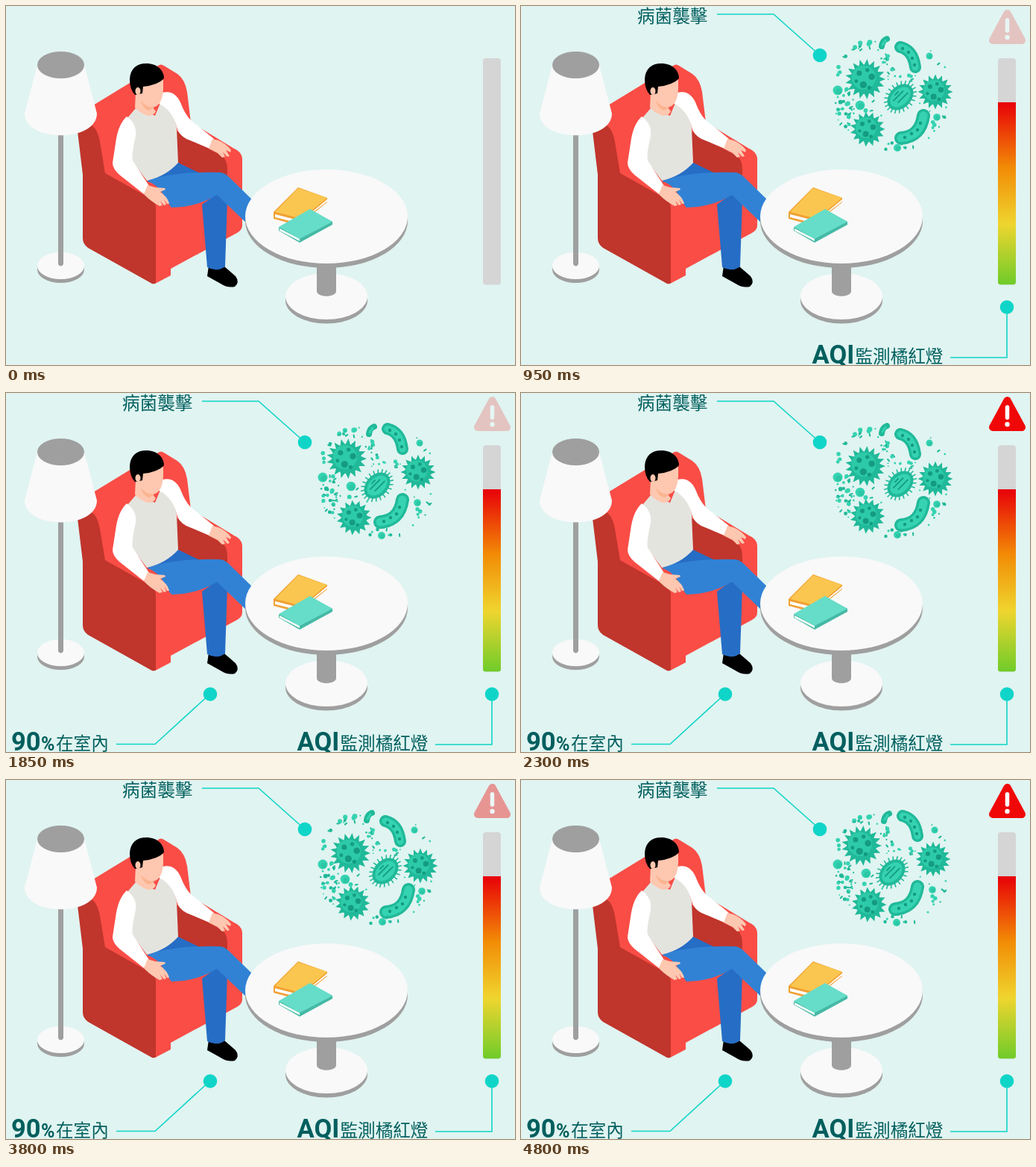
An HTML page for the animation above (5.1 s loop, 683 by 481 pixels).

```html
<!DOCTYPE html>
<html lang="zh-Hant">
<head>
<meta charset="utf-8">
<title>室內空氣</title>
<style>
  html, body { margin: 0; width: 100%; height: 100%; overflow: hidden; background: #e0f4f1; }
  svg { display: block; width: 100vw; height: 100vh; }
  text { font: 500 23.6px "Noto Sans CJK TC", "Noto Sans CJK", sans-serif; fill: #005f5e; }
  .latin { font: 700 34.5px Roboto, sans-serif; }
  .percent { font: 700 25px Roboto, sans-serif; }
  .label path { fill: none; stroke: #0fd5c8; stroke-width: 1.6; }
  .label circle { fill: #0fd5c8; }
  .white { fill: #f9f9f9; } .grey { fill: #9f9f9f; }
  .red { fill: #f94d46; } .maroon { fill: #c0352c; }
  .skin { fill: #fdc7b0; } .blue { fill: #3182d5; } .navy { fill: #266dc5; }
</style>
</head>
<body>
<svg viewBox="0 0 683 481">
  <defs>
    <linearGradient id="scale" gradientUnits="userSpaceOnUse" x1="0" y1="129" x2="0" y2="373">
      <stop offset="0" stop-color="#e80008"/>
      <stop offset=".36" stop-color="#f28c06"/>
      <stop offset=".67" stop-color="#efd52f"/>
      <stop offset="1" stop-color="#70cc2a"/>
    </linearGradient>
    <clipPath id="level"><rect id="levelRect" x="640" width="24"/></clipPath>
  </defs>

  <g id="chair">
    <path class="red" d="M98 168L117 133L204 80Q208 77 212 80L230 91Q240 98 243 115L248 156L306 191Q316 195 317 204V294Q317 300 310 304L221 352V361L200 372L110 250Z"/>
    <path class="maroon" d="M226 166L290 201Q297 206 297 220V240H226Z"/>
    <path class="maroon" d="M96 168L110 158Q122 160 126 182L133 224L194 258Q201 262 201 270V371Q199 373 196 372L110 324Q103 319 103 311V226Z"/>
  </g>

  <g id="lamp">
    <rect class="grey" x="70" y="160" width="7" height="189"/>
    <ellipse class="grey" cx="73.500" cy="353" rx="31.500" ry="18"/>
    <ellipse class="white" cx="73.500" cy="348" rx="31.500" ry="18"/>
    <path class="grey" d="M70 160H77V346Q73.500 351 70 346Z"/>
    <path class="white" d="M42 79L25 144C25 183 122 183 122 144L105 79Z"/>
    <ellipse class="grey" cx="73.500" cy="79" rx="31.500" ry="18"/>
  </g>

  <g id="man">
    <path d="M272 348Q283 357 293 349L308 362Q314 370 307 376Q297 378 288 372L270 362Z"/>
    <path class="navy" d="M263 266L285 250L297 260L294 349Q283 357 270 350ZM229 209L262 225L190 236Z"/>
    <path class="blue" d="M189 234Q230 221 288 223Q294 224 299 229L335 264L326 294L283 253Q255 270 222 270L213 258Q208 242 189 234Z"/>
    <path fill="#e4e4df" d="M162 151L174 137L200 147L212 118Q225 140 229 163L231 210Q215 228 189 234L168 206Z"/>
    <path class="white" style="fill:#fff" d="M162 148Q150 159 147 184L143 210Q143 218 152 226L185 252L192 241L170 207Q168 200 174 174Q176 158 162 148Z"/>
    <path fill="#fff" d="M210 116Q226 112 234 129Q240 145 248 153L279 178L273 191L242 178Q231 172 229 162Q224 140 204 130Z"/>
    <path class="skin" d="M277 178L285 180Q295 184 302 193L301 196L295 193L300 201L297 202L291 196L294 202L290 203L284 197L272 191ZM190 240L200 243L213 244L214 246L207 249Q217 256 219 265L216 265L212 259L215 266L212 267L207 261L210 267L206 268Q193 261 185 252Z"/>
    <path class="skin" d="M174 116L183 105L211 99V112C210 126 206 134 197 136L201 141Q199 147 190 147Q179 143 173 136Z"/>
    <path fill="#fbb48f" d="M181 127Q188 136 199 136L192 140Q184 138 181 127Z"/>
    <path d="M173 119Q166 112 166 98C167 84 175 77 188 77C204 77 212 87 212 97Q204 106 184 108L183 117L179 118Z"/>
    <ellipse class="skin" cx="177" cy="114" rx="3.500" ry="5"/>
  </g>

  <g id="table">
    <ellipse class="grey" cx="430" cy="394.500" rx="55" ry="31"/>
    <ellipse class="white" cx="430" cy="389" rx="55" ry="31"/>
    <path class="grey" d="M417 335H443V382C443 391 417 391 417 382Z"/>
    <ellipse class="grey" cx="430" cy="288" rx="109" ry="63"/>
    <ellipse class="white" cx="430" cy="282" rx="109" ry="63"/>
    <path fill="#f0a033" d="M359 276L392 243L431 257V263L392 294L359 285Z"/>
    <path fill="#fff" d="M361 279L396 288L431 259V262L393 291L361 283Z"/>
    <path fill="#fbc64f" d="M361 276L392 244L431 257L397 285Z"/>
    <path fill="#45b9a5" d="M366 297L408 273L438 289V293L394 317L366 301Z"/>
    <path fill="#fff" d="M367 298L394 312V315L367 301Z"/>
    <path fill="#66ddc8" d="M366 296L408 272L438 289L394 312Z"/>
  </g>

  <g id="gauge">
    <rect x="640" y="70" width="24" height="303.500" rx="4" fill="#d5d5d5"/>
    <path clip-path="url(#level)" fill="url(#scale)" d="M640 129H664V369.500Q664 373.500 660 373.500H644Q640 373.500 640 369.500Z"/>
  </g>

  <g id="warning">
    <path d="M652.500 10L672 46H633Z" fill="#f00808" stroke="#f00808" stroke-width="10" stroke-linejoin="round"/>
    <path d="M652.500 19V33" stroke="#fff" stroke-width="5.500" stroke-linecap="round"/>
    <circle cx="652.500" cy="42" r="3.200" fill="#fff"/>
  </g>

  <g id="germLabel" class="label">
    <text x="156" y="22">病菌襲擊</text>
    <path d="M263 11H339L401 66"/><circle cx="401" cy="66" r="9.300"/>
  </g>
  <g id="germs"></g>
  <g id="aqiLabel" class="label">
    <text x="448" y="478"><tspan class="latin" x="390.500" y="479">AQI</tspan><tspan x="448.500" y="478">監測橘紅燈</tspan></text>
    <path d="M576 471H652V403"/><circle cx="652" cy="403.500" r="9.300"/>
  </g>
  <g id="indoorLabel" class="label">
    <text><tspan class="latin" x="7" y="479">90</tspan><tspan class="percent" x="47" y="479">%</tspan><tspan x="67" y="478">在室內</tspan></text>
    <path d="M148 470.500H200L274 403"/><circle cx="274" cy="403.500" r="9.300"/>
  </g>
</svg>
<script>
const LOOP = 5100, STEP = 50;
const LIGHT = '#35d3b1', MID = '#20b999', DARK = '#149b82';
const $ = id => document.getElementById(id);
const clamp = v => Math.max(0, Math.min(1, v));
const ramp = (t, start, length) => clamp((t - start) / length);

let seed = 11;
const random = () => (seed = seed * 16807 % 2147483647) / 2147483647;

const circle = (x, y, r, fill) => `<circle cx="${x}" cy="${y}" r="${r}" fill="${fill}"/>`;
const stroke = (d, color, width) =>
  `<path d="${d}" fill="none" stroke="${color}" stroke-width="${width}" stroke-linecap="round"/>`;

function virus(radius, spikes) {
  const points = Array.from({ length: spikes * 2 }, (_, i) => {
    const a = i * Math.PI / spikes, r = radius * (i % 2 ? 0.7 : 1);
    return [r * Math.cos(a), r * Math.sin(a)].map(v => v.toFixed(1));
  });
  const spots = [[-.3, -.3, .13], [.32, -.12, .16], [-.1, .28, .17], [.2, .42, .1], [-.45, .1, .09], [.1, -.45, .1]];
  return `<polygon points="${points.join(' ')}" fill="${MID}"/>` +
    circle(0, 0, radius * .73, MID) + circle(-radius * .08, -radius * .08, radius * .6, '#2dcaa8') +
    spots.map(([x, y, r]) => circle(x * radius, y * radius, r * radius, DARK)).join('');
}

function bean(curve, width, spots) {
  return stroke(curve, MID, width) + stroke(curve, LIGHT, width - 7) +
    spots.map(([x, y]) => circle(x, y, 2.2, DARK)).join('');
}

function hairyCell() {
  let hairs = '';
  for (let i = 0; i < 22; i++) {
    const a = i * Math.PI / 11, x = Math.cos(a), y = Math.sin(a);
    hairs += `M${18 * x} ${13 * y}L${24 * x} ${18.5 * y}`;
  }
  return `<g transform="rotate(-45)">${stroke(hairs, MID, 1.6)}
    <ellipse rx="20" ry="14.5" fill="${MID}"/><ellipse rx="16" ry="10.5" fill="${LIGHT}"/>
    ${stroke('M-10 -3H8M-7 3H11M-3 -7H3', DARK, 1.8)}</g>`;
}

// Each part has one place per pose.
const parts = [
  [virus(27, 17), [462, 98], [457, 88], [462, 92]],
  [virus(23.5, 16), [556, 115], [553, 106], [557, 110]],
  [virus(23.5, 15), [465, 165], [467, 167], [472, 171]],
  [hairyCell(), [509, 122], [498, 124], [507, 125]],
  [bean('M-10 -13Q7 -9 10 14', 16, [[-7, -11], [1, -6], [6, 2], [9, 11]]), [519, 68], [522, 61], [525, 68]],
  [bean('M-15 15Q11 13 15 -15', 18, [[-10, 14], [-1, 9], [7, 4], [11, -5]]), [525, 162], [517, 158], [524, 157]],
  [stroke('M-3 5Q-2 -3 4 -5', MID, 8) + stroke('M-2 3L2 -3', LIGHT, 3), [487, 49], [490, 50], [490, 47]],
  ...[
    [6.5, [425, 113], [425, 113], [420, 110]],
    [6.3, [455, 133], [463, 125], [459, 131]],
    [5, [505, 190], [504, 191], [505, 191]],
    [4.8, [558, 149], [552, 147], [558, 143]],
    [4.5, [548, 67], [555, 67], [555, 67]]
  ].map(([r, ...places]) => [circle(0, 0, r, LIGHT) + circle(r * .2, r * .2, r * .6, '#2cc7a6'), ...places])
];
const bodies = parts.map(part => part.slice(1));
const bodySizes = [28, 25, 25, 24, 25, 26, 9, 9, 9, 8, 7, 7];
const isFree = (x, y) => bodies.every((places, i) =>
  places.every(p => Math.hypot(x - p[0], y - p[1]) > bodySizes[i]));

for (let tries = 0, count = 0; tries < 3000 && count < 105; tries++) {
  const a = random() * 2 * Math.PI, d = 80 * Math.sqrt(random());
  const x = 497 + d * Math.cos(a), y = 117 + d * Math.sin(a);
  if (!isFree(x, y)) continue;
  const r = .9 + 2.5 * random() ** 2, turn = random() * 180;
  const shape = count % 4 ? circle(0, 0, r, count % 3 ? LIGHT : MID)
    : `<g transform="rotate(${turn})">${stroke('M-1.5 0H1.5', MID, 2)}</g>`;
  const shifted = () => [x + 4 * random() - 2, y + 4 * random() - 2];
  parts.push([shape, [x, y], shifted(), shifted()]);
  count++;
}
$('germs').innerHTML = parts.map(part => `<g>${part[0]}</g>`).join('');
const germNodes = [...$('germs').children];

function warningOpacity(t) {
  const since = t >= 3400 ? t - 3400 : t - 900;
  if (since < 0) return 0;
  if (since >= 1250) return 1;
  return 1 - Math.abs(since % 500 - 250) / 250;
}

function draw(now) {
  const t = Math.floor(now % LOOP / STEP) * STEP;
  const height = 244.5 * ramp(t, 0, 500);
  $('levelRect').setAttribute('y', 373.5 - height);
  $('levelRect').setAttribute('height', height);

  $('aqiLabel').style.opacity = ramp(t, 250, 250);
  $('germs').style.opacity = $('germLabel').style.opacity = ramp(t, 600, 250);
  $('indoorLabel').style.opacity = ramp(t, 1150, 250);
  $('warning').style.opacity = warningOpacity(t);

  const pose = Math.max(0, Math.floor((t - 50) / 250)) % 3;
  germNodes.forEach((node, i) =>
    node.setAttribute('transform', `translate(${parts[i][1 + pose]})`));
}

const start = performance.now();
function tick() {
  draw(performance.now() - start);
  requestAnimationFrame(tick);
}
tick();
</script>
</body>
</html>
```
